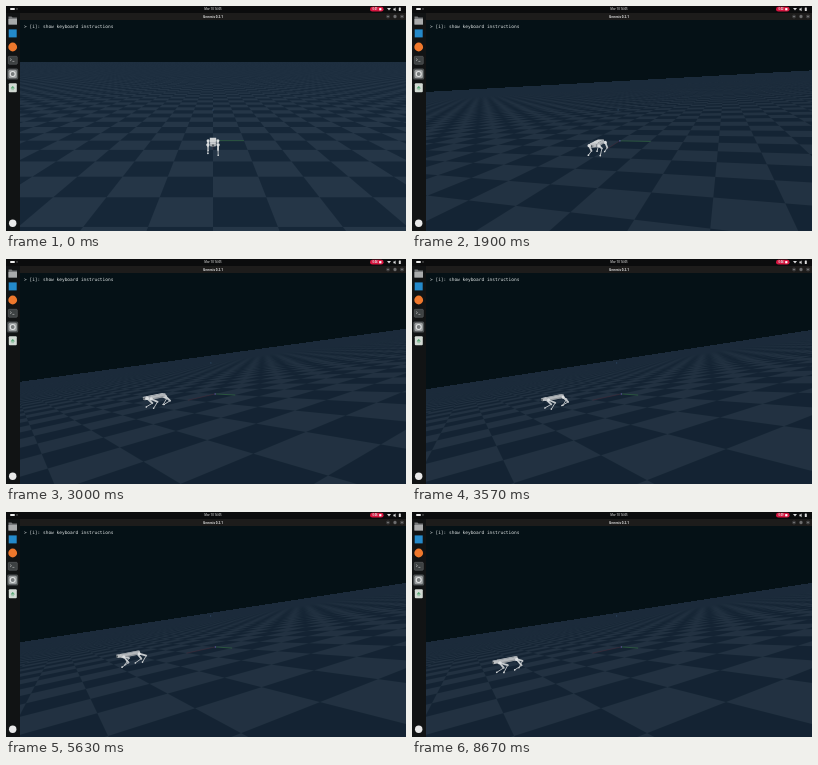
Animation, 400 px wide and 225 px high, one loop 8.7 s. Source, as an HTML page with a canvas:

```html
<!DOCTYPE html>
<html lang="en">
<head>
<meta charset="utf-8">
<title>Robot walk simulation</title>
<style>
  html, body { margin: 0; width: 100%; height: 100%; overflow: hidden; background: #0b0c0d; }
  canvas { position: absolute; left: 14px; top: 14px; }
  svg { position: absolute; left: 0; top: 0; }
  .ui { font: 700 3.1px "Open Sans", sans-serif; fill: #dcdcdc; text-anchor: middle; }
  .mono { font: 4.5px "DejaVu Sans Mono", monospace; fill: #dfe4e4; white-space: pre; }
</style>
</head>
<body>
<canvas id="view" width="386" height="211"></canvas>
<svg width="400" height="225" viewBox="0 0 400 225">
  <path d="M0 0H400V7H0z" fill="#0b0c0d"/>
  <path d="M0 7H14V225H0z" fill="#111314"/>
  <path d="M14 7H400V14H14z" fill="#1d1c1b"/>
  <rect x="4" y="1.9" width="5" height="2" rx="1" fill="#eee"/>
  <circle cx="11" cy="2.9" r=".7" fill="#888"/>
  <text class="ui" x="207" y="4.2" style="font-size:2.8px;fill:#aaa">Mar 10 14:05</text>
  <text class="ui" x="207" y="11.6">Genesis 0.2.1</text>
  <rect x="364" y=".8" width="13.6" height="4.8" rx="2.4" fill="#d8143f"/>
  <text class="ui" id="clock" x="369" y="4.2" style="font-size:2.6px">0:02</text>
  <rect x="373.2" y="2.1" width="2.2" height="2.2" fill="#fff"/>
  <g fill="#ddd">
    <path d="M381 2L385 2L383 4.6z"/>
    <path d="M387.4 2.6h1l1.2-1v3.6l-1.2-1h-1z"/>
    <rect x="392.8" y="1.6" width="2" height="3.4" rx=".5"/>
  </g>
  <g fill="#3a3a3b">
    <circle cx="382" cy="10.5" r="2"/><circle cx="389" cy="10.5" r="2"/><circle cx="396" cy="10.5" r="2"/>
  </g>
  <path d="M381 10.6h2M388.2 9.7h1.6v1.6h-1.6zM395.2 9.7l1.6 1.6m0-1.6l-1.6 1.6" stroke="#ccc" stroke-width=".4" fill="none"/>
  <path d="M2.5 10.5h3l1 1h4.5v7h-8.5z" fill="#77797b"/>
  <path d="M2.5 13h8.5v5.5h-8.5z" fill="#a9abac"/>
  <rect x="2.7" y="23.4" width="8" height="8" fill="#2489ca"/>
  <circle cx="6.7" cy="41" r="4.4" fill="#f0782c"/>
  <rect x="2.3" y="50.3" width="9" height="8" rx="1" fill="#3d4142" stroke="#66696a" stroke-width=".5"/>
  <path d="M4 52.5l1.5 1.2L4 55m2.4.4h2" stroke="#ddd" stroke-width=".5" fill="none"/>
  <rect x="1.2" y="62.5" width="11" height="11" rx="1.5" fill="#4b4f50"/>
  <rect x="2.5" y="63.8" width="8.4" height="8.4" rx="1.5" fill="#9a9d9e"/>
  <circle cx="6.7" cy="68" r="2.5" fill="#777b7c" stroke="#e0e2e2" stroke-width="1.1"/>
  <rect x="2.8" y="77.3" width="8" height="9" rx="1" fill="#d3dad4"/>
  <path d="M5 82.3l1.7-2.2 1.7 2.2zm.4 1.4h2.6" fill="#5da878" stroke="#5da878" stroke-width=".5"/>
  <circle cx="6.7" cy="217.3" r="3.7" fill="#e9e9e9"/>
  <text class="mono" x="18" y="22.3">&gt; [i]: show keyboard instructions</text>
</svg>
<script>
const LOOP = 8700, W = 386, H = 211, CX = W / 2, CY = H / 2;
const FOCAL = CY / Math.tan(Math.PI / 9), DIST = 9.24, TARGET = [0, 0, 0.5];
const SKY = [5, 17, 22];
// time, yaw, pitch, roll in degrees
const CAMERA = [
  [0, 0, 12.4, 0], [1260, 0, 12.4, 0], [1900, 20.3, 8.7, 3.2],
  [2470, 38.6, 6.6, 5.6], [3220, 62.5, 3.7, 8.75], [LOOP, 62.5, 3.7, 8.75]
];
const ctx = document.getElementById('view').getContext('2d');
const clock = document.getElementById('clock');
const floor = ctx.createImageData(W, H);
let floorPose = '';

const dot = (a, b) => a[0] * b[0] + a[1] * b[1] + a[2] * b[2];
const blend = (a, m, b, n) => a.map((v, i) => v * m + b[i] * n);
const mix = (a, b, k) => a + (b - a) * k;

function poseAt(t) {
  const i = CAMERA.findIndex((k, n) => n && t <= k[0]);
  const a = CAMERA[i - 1], b = CAMERA[i], k = (t - a[0]) / (b[0] - a[0]);
  return [1, 2, 3].map(n => mix(a[n], b[n], k));
}

function makeCamera(pose) {
  const [yaw, pitch, roll] = pose.map(d => d * Math.PI / 180);
  const cy = Math.cos(yaw), sy = Math.sin(yaw), cp = Math.cos(pitch), sp = Math.sin(pitch);
  const cr = Math.cos(roll), sr = Math.sin(roll);
  const fwd = [-cp * cy, -cp * sy, -sp], side = [-sy, cy, 0], top = [-sp * cy, -sp * sy, cp];
  return {
    fwd, right: blend(side, cr, top, -sr), up: blend(top, cr, side, sr),
    pos: blend(TARGET, 1, fwd, -DIST)
  };
}

function project(cam, p) {
  const d = blend(p, 1, cam.pos, -1), s = FOCAL / dot(d, cam.fwd);
  return [CX + dot(d, cam.right) * s, CY - dot(d, cam.up) * s, s];
}

// integral of an alternating unit wave over a window of width w
function wave(p, w) {
  const tri = v => Math.abs(v - Math.floor(v) - 0.5);
  return 2 * (tri((p - w / 2) / 2) - tri((p + w / 2) / 2)) / w;
}

function renderFloor(cam, yaw) {
  const { fwd, right, up, pos } = cam, px = floor.data, TAPS = 6;
  const dim = 1 - 0.09 * Math.min(1, yaw / 25);
  const dark = [22, 39, 56].map(v => v * dim), light = [37, 54, 71].map(v => v * dim);
  for (let y = 0, o = 0; y < H; y++) {
    const v = (CY - y - 0.5) / FOCAL;
    for (let x = 0; x < W; x++, o += 4) {
      const u = (x + 0.5 - CX) / FOCAL;
      const dz = fwd[2] + right[2] * u + up[2] * v;
      px[o + 3] = 255;
      if (dz > -1e-4) {
        for (let c = 0; c < 3; c++) px[o + c] = SKY[c];
        continue;
      }
      const dx = fwd[0] + right[0] * u + up[0] * v, dy = fwd[1] + right[1] * u + up[1] * v;
      const t = -pos[2] / dz, s = t / FOCAL, rz = right[2] / dz, uz = up[2] / dz;
      const ax = s * (right[0] - dx * rz), ay = s * (right[1] - dy * rz);
      const bx = s * (up[0] - dx * uz), by = s * (up[1] - dy * uz);
      const wx = Math.abs(ax) + Math.abs(bx) / TAPS + 1e-4;
      const wy = Math.abs(ay) + Math.abs(by) / TAPS + 1e-4;
      let sum = 0;
      for (let n = 0; n < TAPS; n++) {
        const k = (n + 0.5) / TAPS - 0.5;
        sum += wave(pos[0] + dx * t + bx * k, wx) * wave(pos[1] + dy * t + by * k, wy);
      }
      const m = 0.5 - 0.5 * sum / TAPS;
      for (let c = 0; c < 3; c++) px[o + c] = mix(dark[c], light[c], m);
    }
  }
}

function stroke(cam, pts, color, width) {
  ctx.beginPath();
  pts.forEach(p => ctx.lineTo(...project(cam, p).slice(0, 2)));
  ctx.strokeStyle = color;
  ctx.lineWidth = width;
  ctx.stroke();
}

function ball(cam, p, r, color) {
  const [x, y, s] = project(cam, p);
  ctx.beginPath();
  ctx.arc(x, y, r * s, 0, 7);
  ctx.fillStyle = color;
  ctx.fill();
}

function box(cam, c, half, tone) {
  for (let axis = 0; axis < 3; axis++) {
    const sign = Math.sign(cam.pos[axis] - c[axis]) || 1;
    const a = (axis + 1) % 3, b = (axis + 2) % 3;
    ctx.beginPath();
    for (const [i, j] of [[-1, -1], [1, -1], [1, 1], [-1, 1]]) {
      const p = c.slice();
      p[axis] += sign * half[axis];
      p[a] += i * half[a];
      p[b] += j * half[b];
      ctx.lineTo(...project(cam, p).slice(0, 2));
    }
    ctx.fillStyle = `hsl(210 5% ${tone * [0.78, 0.86, 1][axis]}%)`;
    ctx.fill();
  }
}

function drawAxes(cam) {
  stroke(cam, [[0, 0, 0], [1, 0, 0]], '#5a2a3a88', 0.7);
  stroke(cam, [[0, 0, 0], [0, 1, 0]], '#2f6040', 0.8);
  ball(cam, [0, 0, 0], 0.025, '#57509a');
  ball(cam, [0, 0, 1], 0.02, '#2f4a66');
}

function drawLeg(cam, x, fx, fy, t) {
  const phase = 2 * Math.PI * t / 560 + (fx * fy > 0 ? 0 : Math.PI);
  const hip = [x + 0.21 * fx, 0.14 * fy, 0.285];
  const foot = [hip[0] + 0.02 + 0.075 * Math.cos(phase), hip[1], 0.02 + 0.05 * Math.max(0, -Math.sin(phase))];
  const dx = foot[0] - hip[0], dz = foot[2] - hip[2], len = Math.hypot(dx, dz);
  const bend = Math.sqrt(Math.max(0, 0.205 ** 2 - len * len / 4));
  const knee = [hip[0] + dx / 2 + dz / len * bend, hip[1], hip[2] + dz / 2 - dx / len * bend];
  stroke(cam, [hip, knee], '#c6cacd', 1.8);
  stroke(cam, [knee, foot], '#b3b8bc', 1);
  ball(cam, hip, 0.043, '#dcdfe1');
  ball(cam, foot, 0.022, '#d7dadc');
}

function drawRobot(cam, t) {
  const x = 1.25 + 0.25 * t / 1000, z = 0.3 + 0.005 * Math.sin(t / 45);
  const legs = [[1, 1], [1, -1], [-1, 1], [-1, -1]]
    .map(([fx, fy]) => ({ fx, fy, depth: dot([x + 0.21 * fx, 0.14 * fy, 0], cam.fwd) }))
    .sort((a, b) => b.depth - a.depth);
  const drawLegs = list => list.forEach(l => drawLeg(cam, x, l.fx, l.fy, t));
  ctx.lineCap = ctx.lineJoin = 'round';
  drawLegs(legs.slice(0, 2));
  box(cam, [x, 0, z + 0.01], [0.25, 0.09, 0.05], 83);
  stroke(cam, [[x - 0.17, 0.09, z - 0.02], [x + 0.15, 0.09, z - 0.02]], '#777d82', 0.6);
  box(cam, [x + 0.3, 0, z + 0.02], [0.06, 0.07, 0.04], 87);
  ball(cam, [x + 0.36, 0, z + 0.015], 0.025, '#4a5258');
  drawLegs(legs.slice(2));
}

function frame(now) {
  const t = now % LOOP, pose = poseAt(t), cam = makeCamera(pose);
  if (floorPose !== String(pose)) {
    renderFloor(cam, pose[0]);
    floorPose = String(pose);
  }
  ctx.putImageData(floor, 0, 0);
  drawAxes(cam);
  drawRobot(cam, t);
  clock.textContent = '0:0' + Math.min(9, 1 + Math.floor(t / 1000));
  requestAnimationFrame(frame);
}
requestAnimationFrame(frame);
</script>
</body>
</html>
```
